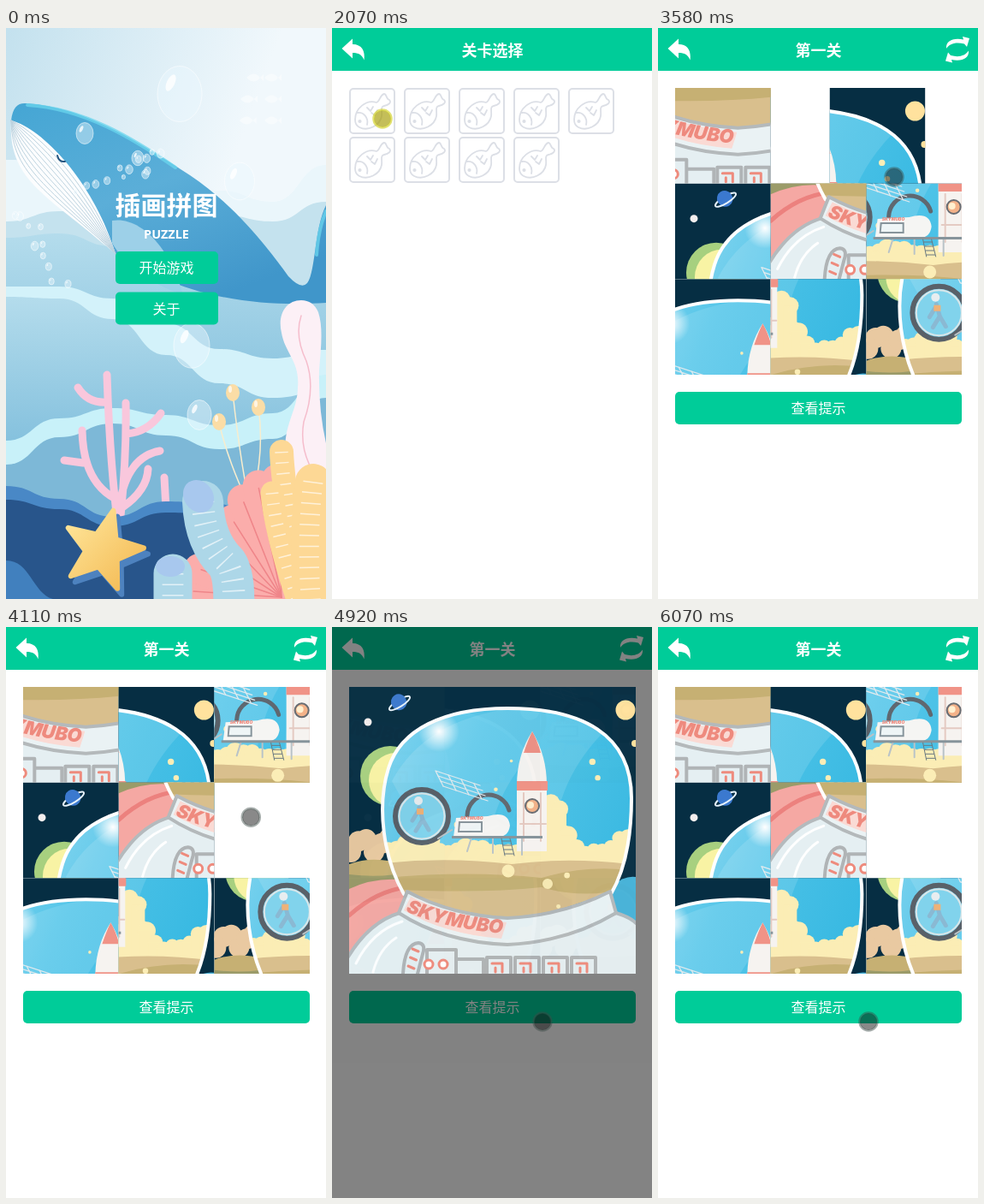
Recreate the animation shown at these times as an HTML page. Size 374 by 667 pixels, loop 6.5 s.

```html
<!DOCTYPE html>
<html lang="zh">
<head>
<meta charset="utf-8">
<style>
html, body { margin: 0; width: 100%; height: 100%; overflow: hidden; background: #fff }
svg { display: block }
#stage { width: 374px; height: 667px }
text { font-family: "Noto Sans CJK SC", "Noto Sans", sans-serif; fill: #fff; text-anchor: middle; font-size: 16px }
.title { font-size: 18px; font-weight: 700 }
.line { fill: none; stroke-linecap: round; stroke-linejoin: round }
.brand { font: italic 900 22px Inter, sans-serif; fill: #ee8a7e; text-anchor: start }
</style>
</head>
<body>
<svg id="stage" viewBox="0 0 374 667">
<defs>
  <linearGradient id="air" x2=".6" y2=".4"><stop stop-color="#c3e1ee"/><stop offset="1" stop-color="#f1f8fc"/></linearGradient>
  <linearGradient id="sea" x2="0" y2="1"><stop stop-color="#b4dcec"/><stop offset=".5" stop-color="#83c0dd"/></linearGradient>
  <linearGradient id="skin" x2=".6" y2="1"><stop stop-color="#45a6d4"/><stop offset=".5" stop-color="#5baed8"/><stop offset="1" stop-color="#4096ca"/></linearGradient>
  <linearGradient id="gold" x2="1" y2="1"><stop stop-color="#ffe79c"/><stop offset="1" stop-color="#f3b74f"/></linearGradient>
  <linearGradient id="glass" x2="1" y2=".4"><stop stop-color="#86d5ef"/><stop offset=".4" stop-color="#55c6e9"/><stop offset="1" stop-color="#38b9e2"/></linearGradient>
  <radialGradient id="glow"><stop stop-color="#fff"/><stop offset="1" stop-color="#fff" stop-opacity="0"/></radialGradient>
  <path id="shell" d="M84 312C60 270 52 210 66 165C80 120 130 95 205 95C292 95 350 125 350 200C350 250 340 288 326 312"/>
  <path id="rim" d="M86 332Q135 354 212 359"/>
  <clipPath id="dome"><use href="#shell"/><path d="M83 310H327L205 350Z"/></clipPath>
  <path id="swirl" d="M337 24C336 15 345 11 357 13.500L356 10L364 12L361 22L358 18.500C348 16 341 18 337 24Z"/>
  <path id="minnow" d="M-9 0Q0-9 7 0L11-4V4L7 0Q0 9-9 0Z"/>
  <g id="fish" fill="none" stroke="#dcdfe6" stroke-width="1.800" stroke-linecap="round" stroke-linejoin="round">
    <rect x="1" y="1" width="52" height="52" rx="4" stroke-width="2"/>
    <path d="M7 37C7 24 20 13 32 17C36 16 36 8 41 7C44 7 43 13 47 14C50 17 46 20 41 21C36 22 39 27 38 33C36 44 22 51 12 46C8 44 7 41 7 37ZM10 29C17 28 23 35 21 43M21 23L25 27L28 22M26 29L30 32L33 26"/>
    <circle cx="12.500" cy="39" r="1.200" fill="#dcdfe6"/>
  </g>
  <g id="art"></g>
</defs>

<g id="home">
  <g id="scenery"></g>
  <text x="187.500" y="218" style="font-size:30px;font-weight:700">插画拼图</text>
  <text x="187.500" y="246" style="font:700 14.400px 'Noto Sans',sans-serif">PUZZLE</text>
  <g fill="#00cc99"><rect x="128" y="261" width="120" height="38" rx="5"/><rect x="128" y="308.500" width="120" height="38" rx="5"/></g>
  <text x="187.500" y="286">开始游戏</text><text x="187.500" y="333.500">关于</text>
</g>

<g id="inner">
  <path fill="#fff" d="M0 0H374V667H0Z"/>
  <path fill="#00cc99" d="M0 0H374V50H0Z"/>
  <path fill="#fff" d="M11.500 24L24 12.500V19C35 19 39 27 37.500 37.500C35 31 31 29 24 29V35.500Z"/>
  <g id="levels"><text class="title" x="187.500" y="32.500">关卡选择</text></g>
  <g id="game">
    <text class="title" x="187.500" y="32.500">第一关</text>
    <g fill="#fff"><use href="#swirl"/><use href="#swirl" transform="rotate(180 350 25.300)"/></g>
    <g id="board"></g>
    <rect x="20" y="425" width="335" height="38" rx="5" fill="#00cc99"/>
    <text x="187.500" y="450">查看提示</text>
    <g id="hint">
      <path fill-opacity=".5" d="M0 0H374V667H0Z"/>
      <svg x="20" y="70" width="335" height="335" viewBox="20 70 335 335"><use href="#art"/></svg>
    </g>
  </g>
</g>
<g id="cursor"><circle r="10"/><circle r="10.500" fill="none" stroke-width="2.500"/></g>
</svg>

<script>
const $ = id => document.getElementById(id);
const show = (id, on) => $(id).style.display = on ? '' : 'none';
const add = (id, markup) => $(id).insertAdjacentHTML('beforeend', markup);
const clamp = v => Math.min(1, Math.max(0, v));
const mix = (a, b, k) => a + (b - a) * k;
const repeat = (n, f) => Array.from({ length: n }, (_, i) => f(i)).join('');

let seed = 7;
const random = (a, b) => mix(a, b, (seed = seed * 16807 % 2147483647) / 2147483647);

// Drawing helpers that return SVG markup
const shape = (fill, d, extra = '') => `<path fill="${fill}" d="${d}" ${extra}/>`;
const line = (stroke, width, d, extra = '') => `<path class="line" stroke="${stroke}" stroke-width="${width}" d="${d}" ${extra}/>`;
const oval = (fill, x, y, rx, ry = rx, extra = '') => `<ellipse cx="${x}" cy="${y}" rx="${rx}" ry="${ry}" fill="${fill}" ${extra}/>`;
const bell = (x, center, width) => Math.exp(-(((x - center) / width) ** 2));

// A layer filled to the floor under a smooth crest through evenly spaced heights
function wave(fill, heights) {
  const step = 374 / (heights.length - 1);
  const curve = heights.slice(1).map((y, i) => `C${(i + .5) * step} ${heights[i]} ${(i + .5) * step} ${y} ${(i + 1) * step} ${y}`);
  return shape(fill, `M0 ${heights[0]}${curve.join('')}V667H0Z`);
}

// A rounded finger with ribs across it
const tube = (fill, width, d) => line(fill, width, d) +
  line('#fff', width * .55, d, 'style="stroke-linecap:butt" stroke-dasharray="1.500 11" stroke-opacity=".65"');

const bubble = (x, y, r) => oval('#e9f7fd', x, y, r, r * 1.25, 'fill-opacity=".45" stroke="#fff" stroke-opacity=".55"') +
  oval('#fff', x - r * .4, y - r * .5, r * .18, r * .4, `fill-opacity=".8" transform="rotate(25 ${x - r * .4} ${y - r * .5})"`);

// Small bubbles drifting along a straight trail
const trail = (n, x0, y0, x1, y1, spread) => repeat(n, i => bubble(
  mix(x0, x1, i / n) + random(-spread, spread), mix(y0, y1, i / n) + random(-spread, spread), random(2, 4.5)));

function starfish(x, y, fill) {
  const tips = repeat(10, i => {
    const a = (i * 36 - 75) * Math.PI / 180, r = i % 2 ? 20 : 48;
    return `${i ? 'L' : 'M'}${x + r * Math.cos(a)} ${y + r * Math.sin(a)}`;
  });
  return shape(fill, tips + 'Z', `stroke="${fill}" stroke-width="6" stroke-linejoin="round"`);
}

// Thick spokes make a scalloped fan; thin ones are its veins
const fan = (stroke, width, reach) => repeat(8, i => {
  const a = (183 + i * 12) * Math.PI / 180, r = reach - 28 * bell(i, 3, 2);
  return line(stroke, width, `M322 665L${322 + r * .78 * Math.cos(a)} ${665 + r * Math.sin(a)}`);
});

const belly = k => `C${mix(2, 45, k)} ${mix(180, 118, k)} ${mix(50, 105, k)} ${mix(195, 185, k)} 128 264`;

const whale =
  shape('url(#skin)', 'M6 108C8 92 14 87 24 88C95 92 165 140 215 172C265 205 305 255 330 290Q345 306 352 298C362 285 360 235 374 207V321C310 325 220 322 128 264Z') +
  line('#6ad6ee', 4, 'M25 90C92 94 150 130 198 163M363 265Q365 235 374 214', 'opacity=".75"') +
  shape('#9dd0e8', 'M124 225C150 220 188 245 207 312Q145 290 124 251Z') +
  shape('#fcfdfe', `M6 108${belly(0)}C105 185 45 118 6 108Z`) +
  repeat(9, i => line('#bdd3df', 1, 'M6 108' + belly((i + 1) / 10))) +
  line('#24547f', 2, 'M60 149Q62 157 69 156');

const coral = line('#f9c7dc', 9, 'M130 575Q121 500 118 405M119 437Q96 439 84 420M128 550Q90 530 89 470M90 508L68 505' +
  'M134 570Q141 500 140 438M141 474Q166 472 181 450M135 545Q146 500 180 494M136 560Q165 540 166 515M188 580L185 525');

const balloons = repeat(3, i => {
  const x = 249 + 46 * i % 76, y = 460 - 17 * i;
  return line('#f8edce', 1.5, `M${x} ${y}Q${x + 8} 500 285 560`) + oval('#fbdda6', x, y, 8, 10) + oval('#fff', x - 3, y - 4, 2, 4, 'opacity=".7"');
});

add('scenery',
  shape('url(#air)', 'M0 0H374V667H0Z') +
  wave('#eaf6fb', [154, 156, 176, 168, 190, 203, 160]) +
  wave('#c4e2ee', [226, 214, 220, 228, 218, 226, 203]) +
  wave('url(#sea)', [245, 240, 255, 290, 310, 318, 318]) +
  wave('#d3f2fa', [302, 302, 316, 345, 375, 386, 376]) +
  wave('url(#sea)', [314, 316, 340, 382, 415, 432, 424]) +
  wave('#c8f1f9', [482, 456, 444, 452, 464, 450, 405]) +
  wave('#7db8d7', [510, 478, 462, 476, 492, 480, 432]) +
  whale +
  bubble(203, 77, 26) + bubble(92, 123, 10) + bubble(273, 179, 17.5) + bubble(217, 371, 21) + bubble(226, 452, 14) + bubble(154, 152, 7) +
  trail(13, 95, 180, 190, 150, 14) + trail(10, 15, 215, 70, 305, 11) +
  repeat(6, i => `<use href="#minnow" x="${i % 2 ? 311 : 285 + 5 * Math.cos(i)}" y="${58 + (i >> 1) * 25}" fill="#fff" opacity=".45"/>`) +
  coral +
  wave('#4988c6', [535, 550, 571, 553, 556, 600, 640]) +
  wave('#28558b', [551, 562, 582, 566, 568, 610, 650]) +
  wave('#4180be', [622, 668, 700, 700, 700, 700, 700]) +
  starfish(118, 617, '#4d82bf') + starfish(113, 610, 'url(#gold)') +
  shape('#fcf0f6', 'M345 318C327 318 317 335 322 356C326 380 344 390 341 420C341 447 323 465 327 499Q332 535 354 560L374 550V485Q365 445 366 400C368 375 371 350 365 332Q359 318 345 318Z') +
  line('#f5bdcc', 1.5, 'M345 336Q337 360 351 389Q362 421 348 460Q343 489 357 515') +
  balloons + fan('#fbadab', 36, 138) + fan('#ef8589', 1.5, 135) +
  tube('#add7e8', 48, 'M230 553Q232 600 258 625Q268 640 266 680') + oval('#a8c8ee', 225, 547, 17, 20, 'transform="rotate(-35 225 547)"') +
  tube('#add7e8', 45, 'M195 637V690') + oval('#a8c8ee', 192, 629, 17, 12) +
  tube('#fdd895', 28, 'M322 495Q325 560 350 640') + tube('#fdd895', 27, 'M311 543Q315 590 345 680') + tube('#fdd895', 42, 'M359 530Q350 600 358 690'));

// The foam bank's height is a sum of bumps, covered in puffs.
const foam = repeat(29, i => {
  const x = 66 + i * 10, y = 261 - 58 * bell(x, 260, 14) - 18 * bell(x, 103, 18) - 20 * bell(x, 342, 16) + random(-4, 4);
  return oval('#fbedb5', x, y, random(8, 11)) + shape('#fbedb5', `M${x - 8} ${y}h16V295h-16Z`);
});
const specks = repeat(14, () => oval('#fbedb6', random(90, 330), random(150, 350), random(1.5, 4)));

const rocket =
  shape('#f6f3f0', 'M216 262V185Q216 150 234 122Q251 150 251 185V262Z') +
  shape('#f09387', 'M224 147Q229 132 234 122Q240 132 244 147ZM216 180H252V191H216Z') +
  line('#e4cac2', 2, 'M224 194V250M244 194V250M220 230H250') +
  oval('#f3b289', 234, 209, 8, 8, 'stroke="#686c72" stroke-width="2"') + oval('#fff0d0', 232, 208, 4);

const wheel =
  oval('#81d3ec', 105, 221, 31, 31, 'stroke="#596169" stroke-width="6"') + oval('none', 105, 221, 26.5, 26.5, 'stroke="#d9e6e9" stroke-width="2"') +
  line('#8ab9d3', 5, 'M102 211L106 225L98 238M106 225L113 237M94 226L102 213') + oval('#e8edf0', 101, 203, 5) + shape('#efb278', 'M99 212h8v7h-8Z');

const station =
  line('#5f6870', 5, 'M158 220A25 25 0 0 1 207 214') +
  repeat(4, i => line('#e0eaee', 1.3, `M${121 + i * 3} ${168 + i * 6}l52 17M${121 + i * 15} ${168 + i * 5}l9 18`)) +
  line('#b9c3c7', 2, 'M124 247L140 237M163 246L158 262M188 246V264M222 247V266') +
  shape('#f5f5f3', 'M145 223L182 221Q206 214 208 232Q206 247 190 245H142Z') +
  shape('#86949b', 'M140 244H246V247H140ZM148 227H176V240H147Z') + shape('#eef5f6', 'M150 229H174V238H149Z') +
  '<text class="brand" x="150" y="225" style="font-size:5px">SKYMUBO</text>' +
  line('#697981', 1, 'M198 247l4 20M208 247l5 20' + repeat(4, i => `M${199 + i} ${250 + i * 5}h10`));

const suit =
  shape('#e5eff2', 'M16 390Q42 345 79 334Q205 400 332 334Q352 340 359 350V410H16Z', 'stroke="#b4babd" stroke-width="4"') +
  line('#fff', 3, 'M28 393Q47 355 82 344M48 403Q55 376 75 363') +
  shape('#eaf2f4', 'M88 309Q140 337 205 340Q270 337 325 309L332 334Q275 368 205 371Q130 368 78 334Z', 'stroke="#b4b9bb" stroke-width="4" stroke-linejoin="round"') +
  shape('#fadad4', 'M92 315Q140 339 204 345L198 364Q132 359 84 331Z') +
  '<text class="brand"><textPath href="#rim">SKYMUBO</textPath></text>' +
  line('#b0b4b6', 4, 'M83 405Q85 370 101 369Q110 370 106 382L100 405M111 405V377H145V405M145 388H177V405') +
  repeat(4, i => line('#b0b4b6', 4, `M${181 + i * 33} 405v-19h28v19`) + line('#ee8b7d', 3, `M${187 + i * 33} 393h12v10m-8 0v-5`)) +
  repeat(3, i => line('#ee8b7d', 3, `M${94 - i * 2.5} ${376 + i * 10}l7 3`)) +
  repeat(2, i => oval('#fff', 113 + i * 17, 394, 5, 5, 'stroke="#ee8b7d" stroke-width="3"'));

add('art',
  shape('#062e43', 'M20 70H355V405H20Z') +
  oval('#a7d07f', 68, 174, 35) + oval('#f8f3a4', 75, 179, 32) +
  `<g transform="rotate(-32 79 89)">${oval('#3b79cf', 79, 88, 9)}${oval('none', 79, 89, 14, 4, 'stroke="#e6f2fb" stroke-width="2"')}${shape('#3b79cf', 'M70 87A9 9 0 0 1 88 87Z')}</g>` +
  oval('#f3eeee', 42, 111, 4.5) + oval('#ffe29e', 343, 97, 11.5) + oval('#ffe29e', 354, 136, 4) +
  repeat(6, i => oval('#e9c9a1', 22 + i * 9, 254 + 9 * Math.cos(i * 2), 12)) +
  shape('#c6b073', 'M20 277Q50 266 86 278L95 310H20Z') + shape('#9b9b69', 'M20 289Q60 294 95 285V312H20Z') +
  shape('#f5a8a3', 'M20 306Q55 290 92 297V340L20 392Z') + line('#ec817e', 5, 'M20 337Q52 308 88 304') +
  shape('#49b3d8', 'M328 302Q342 290 355 292V352H320Z') +
  `<g clip-path="url(#dome)">` +
  shape('url(#glass)', 'M50 85H360V380H50Z') +
  shape('#fff', 'M70 180Q110 105 220 94L290 105Q190 160 180 270H120ZM260 95L320 120Q250 190 260 285H215Q210 170 260 95Z', 'opacity=".12"') +
  oval('url(#glow)', 125, 122, 24) + foam +
  shape('#d9bf8d', 'M60 276Q135 268 210 277Q280 268 355 278V380H60Z') +
  shape('#c6b073', 'M60 293Q160 284 245 293Q300 277 355 285V302Q300 320 245 304Q170 312 60 306Z') +
  oval('#fbedb6', 206, 285, 7.5) + oval('#fbedb6', 252, 300, 6) + specks + rocket + wheel + station + '</g>' +
  '<use href="#shell" class="line" stroke="#fff" stroke-width="4"/>' + suit);

add('levels', repeat(9, i => `<use href="#fish" x="${20 + i % 5 * 64}" y="${70 + (i > 4) * 57}"/>`));

// Resting board as column-row of each piece; slides run in this order: slot, offset it comes from, start.
const CELL = 335 / 3, SLIDE = 160;
const board = ['12', '20', '11', '00', '02', '', '10', '21', '01'];
const slides = [[3, 1, 0, 3200], [4, 0, -1, 3360], [1, 1, 0, 3520], [2, 0, 1, 3920]];
add('board', board.map(([col, row]) => col
  ? `<svg width="${CELL}" height="${CELL}" viewBox="${20 + col * CELL} ${70 + row * CELL} ${CELL} ${CELL}"><use href="#art"/></svg>` : '<g/>').join(''));
const slots = [...$('board').children];

// Cursor moves: start, end, destination
const moves = [
  [440, 690, 206, 276], [1380, 1710, 59, 106], [2410, 2980, 186, 270], [3200, 3360, 190, 166],
  [3400, 3520, 276, 174], [3700, 3840, 288, 212], [4100, 4370, 246, 461]
];
const presses = [970, 2070, 4510, 5510];

// CSS "ease": cubic-bezier(.25, .1, .25, 1)
function ease(x) {
  let lo = 0, hi = 1, s;
  for (let i = 0; i < 20; i++) {
    s = (lo + hi) / 2;
    if (.75 * s * (1 - s) + s ** 3 < x) lo = s; else hi = s;
  }
  return .3 * s * (1 - s) ** 2 + 3 * s * s * (1 - s) + s ** 3;
}

function drawCursor(t) {
  show('cursor', t >= 440);
  let x = 348, y = 299;
  for (const [from, to, endX, endY] of moves) {
    const k = clamp((t - from) / (to - from));
    x = mix(x, endX, k);
    y = mix(y, endY, k);
  }
  $('cursor').setAttribute('transform', `translate(${x} ${y})`);
  const down = presses.some(p => t >= p && t < p + 40), [dot, ring] = $('cursor').children;
  dot.setAttribute('fill', down ? 'rgba(164,155,0,.65)' : 'rgba(20,20,20,.5)');
  ring.setAttribute('stroke', down ? 'rgba(210,210,40,.65)' : 'rgba(60,75,70,.45)');
}

function place(slot, dx = 0, dy = 0) {
  slots[slot].setAttribute('x', 20 + (slot % 3 + dx) * CELL);
  slots[slot].setAttribute('y', 70 + (Math.floor(slot / 3) + dy) * CELL);
}

function draw(now) {
  const t = now % 6500;
  show('home', t < 1010);
  show('inner', t >= 1010);
  show('levels', t < 2110);
  show('game', t >= 2110);
  for (const [slot, dx, dy, start] of slides) {
    const left = 1 - clamp((t - start) / SLIDE);
    place(slot, dx * left, dy * left);
  }
  const fade = ease(clamp((t - 4520) / 500)) - ease(clamp((t - 5550) / 500));
  show('hint', fade > .001);
  $('hint').style.opacity = fade;
  drawCursor(t);
}

board.forEach((_, slot) => place(slot));
const begin = performance.now();
(function tick() {
  draw(performance.now() - begin);
  requestAnimationFrame(tick);
})();
</script>
</body>
</html>
```
